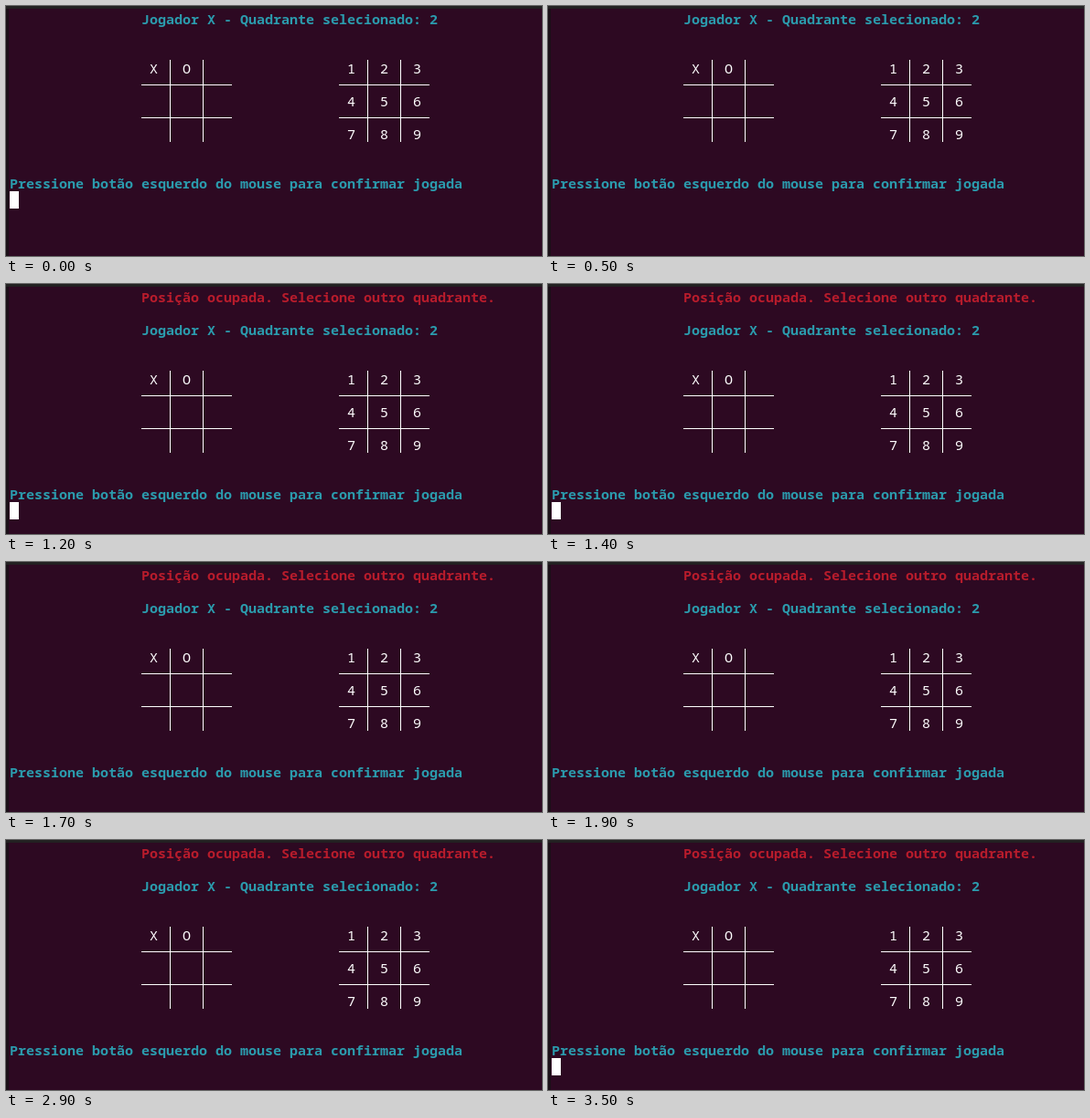
Animation of 586 by 274 pixels, one loop 4.2 s. Source, as an HTML page:

```html
<!DOCTYPE html>
<html lang="pt">
<head>
<meta charset="utf-8">
<style>
  html, body { margin: 0; width: 100%; height: 100%; overflow: hidden; background: #2d0922; }
  svg { display: block; }
  text { font: 15px "Noto Sans Mono", "DejaVu Sans Mono", monospace; fill: #fff; white-space: pre; }
  .info { font-weight: 700; fill: #2b9bad; }
  .error { font-weight: 700; fill: #b81c2c; }
</style>
</head>
<body>
<svg width="586" height="274" viewBox="0 0 586 274">
  <rect width="586" height="274" fill="#2d0922"/>
  <rect width="3" height="274" fill="#1b1018"/>
  <rect width="586" height="3" fill="#232122"/>
  <g id="error"></g>
  <g id="screen"></g>
</svg>
<script>
const LOOP = 4200, ERROR_AT = 1200, BLINK = 600;
const CELL_W = 9, CELL_H = 18, LEFT = 4, TOP = 5;
const errorLayer = document.getElementById("error");
const screenLayer = document.getElementById("screen");

const colX = col => LEFT + col * CELL_W;
const rowY = row => TOP + row * CELL_H;

function add(parent, tag, attrs, content = "") {
  const el = document.createElementNS("http://www.w3.org/2000/svg", tag);
  for (const name in attrs) el.setAttribute(name, attrs[name]);
  el.textContent = content;
  parent.appendChild(el);
  return el;
}

function print(parent, col, row, content, style = "") {
  add(parent, "text", { x: colX(col), y: rowY(row) + 15, class: style }, content);
}

function board(col, row, marks) {
  const x = colX(col), y = rowY(row);
  for (const i of [0, 1]) {
    const barX = x + 31 + i * 36, barY = y + 27 + i * 36;
    add(screenLayer, "rect", { x: barX, y, width: 1, height: 90, fill: "#fff" });
    add(screenLayer, "rect", { x, y: barY, width: 99, height: 1, fill: "#fff" });
  }
  [...marks].forEach((mark, i) =>
    print(screenLayer, col + 1 + (i % 3) * 4, row + Math.floor(i / 3) * 2, mark));
}

print(errorLayer, 16, 0, "Posição ocupada. Selecione outro quadrante.", "error");
print(screenLayer, 16, 0, "Jogador X - Quadrante selecionado: 2", "info");
board(16, 3, "XO");
board(40, 3, "123456789");
print(screenLayer, 0, 10, "Pressione botão esquerdo do mouse para confirmar jogada", "info");
const cursor = add(screenLayer, "rect",
  { x: LEFT, y: rowY(11), width: 10, height: 19, fill: "#fff" });

function render(t) {
  const failed = t >= ERROR_AT;
  errorLayer.setAttribute("visibility", failed ? "visible" : "hidden");
  screenLayer.setAttribute("transform", `translate(0 ${failed ? 2 * CELL_H : 0})`);
  // The last blink stays lit until the loop restarts.
  const phase = Math.floor((Math.min(t, LOOP - 200) + 100) / BLINK);
  cursor.setAttribute("opacity", phase % 2 ? 0 : 1);
}

const start = performance.now();
function tick() {
  render((performance.now() - start) % LOOP);
  requestAnimationFrame(tick);
}
tick();
</script>
</body>
</html>
```
